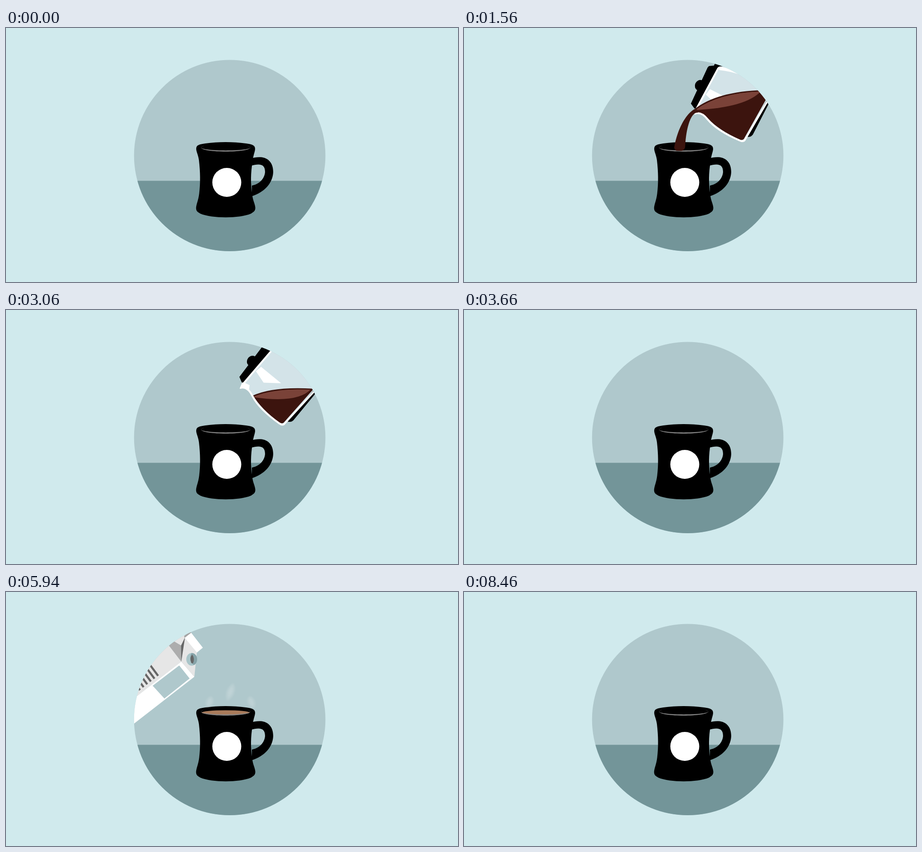
Animation of 998x561 px, one loop 9 s. Source, as an HTML page with a canvas:

```html
<!DOCTYPE html>
<html lang="en">
<head>
<meta charset="utf-8">
<title>Coffee with milk</title>
<style>
  html, body { margin: 0; width: 100%; height: 100%; overflow: hidden; background: #d0eaed; }
  canvas { display: block; width: 998px; height: 561px; }
</style>
</head>
<body>
<canvas id="stage" width="998" height="561"></canvas>
<script>
const ctx = document.getElementById('stage').getContext('2d');
const LOOP = 9000, STEP = 60;
const COFFEE = '#3c140e', WALL = '#afc8cc', PALE = '#e6e6e6', DARK = '#666';

const clamp = v => Math.max(0, Math.min(1, v));
const span = (t, a, b) => clamp((t - a) / (b - a));
const mix = (a, b, u) => a + (b - a) * u;
const mixPt = (p, q, u) => [mix(p[0], q[0], u), mix(p[1], q[1], u)];
const smooth = u => u * u * (3 - 2 * u);
const easeOut = u => 1 - (1 - u) * (1 - u);

// point on a cubic curve given as four points
function onCurve([a, b, c, d], u) {
  const ab = mixPt(a, b, u), bc = mixPt(b, c, u), cd = mixPt(c, d, u);
  return mixPt(mixPt(ab, bc, u), mixPt(bc, cd, u), u);
}

function fill(path, color) {
  ctx.fillStyle = color;
  ctx.fill(typeof path === 'string' ? new Path2D(path) : path);
}

function line(path, color, width) {
  ctx.strokeStyle = color;
  ctx.lineWidth = width;
  ctx.lineJoin = ctx.lineCap = 'round';
  ctx.stroke(new Path2D(path));
}

function ellipse(x, y, rx, ry, turn = 0) {
  const p = new Path2D();
  p.ellipse(x, y, rx, ry, turn, 0, Math.PI * 2);
  return p;
}

function layer(draw) {
  ctx.save();
  draw();
  ctx.restore();
}

function rotateAt(x, y, deg) {
  ctx.translate(x, y);
  ctx.rotate(deg * Math.PI / 180);
  ctx.translate(-x, -y);
}

const disc = ellipse(494, 281.8, 211.3, 211.3);
const opening = new Path2D('M283 60H706V264H539A54 7.5 0 0 1 431 264H283Z');

// --- mug ---
const mugBody = new Path2D(
  'M420 267C420 258 427 257 440 255C468 251 502 251 530 255C544 257 550 259 550 267' +
  'C550 273 546 280 544.5 294C540 322 540 342 543.5 367C545 382 550 388 550.5 397' +
  'C550.5 404 547 406 541 410C515 421 455 421 429 410C423 406 420 405 419.700 398' +
  'C419.700 390 424.500 382 426.500 366C429.500 342 429 318 426 292C424.500 280 420 273 420 267Z');
const mugHandle = new Path2D(
  'M540 288.500C548 286 554 285 562 285.300C580 286.500 590 299 590 318' +
  'C589 343 570 363 543 371.500V348C559 345 571 333 572 318C572 300 560 299 540 304.500Z');

function mug() {
  fill(mugHandle, '#000');
  fill(mugBody, '#000');
  fill(ellipse(487.5, 341, 32, 32), '#fff');
}

function mugRim() {
  fill('M430.500 264C433 276 537 276 539.500 264C536 272.500 434 272.500 430.500 264Z', '#858585');
  line('M431 265Q430 262 436 260.500M539 265Q540 262 534 260.500', '#333', 0.7);
}

function milkyCoffee(t) {
  const rise = smooth(span(t, 4920, 5640));
  if (!rise || t >= 8460) return;
  layer(() => {
    ctx.clip(ellipse(485, 265.5, 54, 7));
    ctx.globalAlpha = 1 - span(t, 7800, 8400);
    fill(ellipse(485, mix(277, 266.5, rise), 53, 5.3), '#a97b5b');
  });
}

// --- a falling liquid between two curves, shown from u = tail to u = head ---
const coffeeFall = [
  [[513, 177], [488, 188], [468, 230], [462.5, 274]],
  [[517, 187], [499, 184], [488, 230], [488, 274]]
];
const milkFall = [
  [[457, 187], [466, 198], [472, 225], [472, 275]],
  [[463, 187], [476, 196], [482, 225], [483, 275]]
];

function stream([left, right], tail, head, color) {
  if (head - tail < 0.02) return;
  const a = [], b = [], n = 40;
  for (let i = 0; i <= n; i++) {
    const u = mix(tail, head, i / n);
    const p = onCurve(left, u), q = onCurve(right, u);
    const pinch = 0.5 - 0.5 * Math.sqrt(clamp((head - u) / 0.07));
    a.push(mixPt(p, q, pinch));
    b.unshift(mixPt(q, p, pinch));
  }
  const shape = new Path2D();
  a.concat(b).forEach(p => shape.lineTo(...p));
  layer(() => {
    ctx.clip(opening);
    fill(shape, color);
  });
}

// --- coffee pot ---
const glass = new Path2D(
  'M510 178L558 88Q562 84 570 87C612 98 645 118 690 130L666 163L620 248' +
  'Q615 251 610 248C577 235 552 220 537 203C528 191 521 188 508 190Z');
const inside = new Path2D(
  'M509 181L560 90L700 100L665 161L618 245Q614 249 608 246' +
  'C579 233 554 217 539 200C530 190 520 186 509 188Z');

function pot(t) {
  if (t < 300 || t >= 3660) return;
  const coming = t < 1500;
  const slide = coming ? 1 - easeOut(span(t, 300, 840)) : span(t, 2980, 3600) ** 2;
  const lean = coming ? smooth(span(t, 840, 1200)) : 1 - smooth(span(t, 2480, 3060));
  const drain = span(t, 1200, 2400);

  layer(() => {
    ctx.translate(190 * slide, 8 * slide);
    rotateAt(596, 209, 12 * (1 - lean) + 18 * slide);

    fill('M625 240L668 160L675 163L638 235Q634 241 627 240.500Z', '#000');
    fill(glass, '#d3e3e8');
    fill('M543 135L594 161L556 168L534 147Z', '#fff');
    fill('M558 84Q585 86 612 104Q586 95 564 93Z', '#fff');

    // liquid surface from a to b, sinking as the pot empties
    const a = mixPt(mixPt([526, 181], [510, 180], lean), mixPt([538, 203], [510, 180], lean), drain);
    const b = mixPt(mixPt([654, 115], [658, 129], lean), mixPt([665, 159], [664, 161], lean), drain);
    const mx = (a[0] + b[0]) / 2, my = (a[1] + b[1]) / 2;
    const bow = mix(8, 18, lean);
    const top = `M${a}Q${mx - 25} ${my - bow} ${b}`;

    line('M513.500 177L559 92Q562 87 568 89', '#fff', 5);
    layer(() => {
      ctx.clip(inside);
      fill(`${top}L720 270L480 270Z`, COFFEE);
      fill(`M${a[0] + 4} ${a[1] - 1}Q${mx - 23} ${my - bow + 3} ${b[0] - 4} ${b[1] + 1}` +
           `Q${mx + 38} ${my + 16} ${a[0] + 4} ${a[1] + 1}Z`, '#7a4238');
      line(top, COFFEE, 2.5);
    });
    line('M670 161.500L619.500 248Q616 251.500 610 249' +
         'C577 235 552 219 538 202C529 190 520 186 510 189', '#fff', 4);
    const pouring = t > 1140 && t < 2640;
    if (!pouring) fill('M510 176L507 192Q510 193 514 189Q520 187 528 193L527 180Z', '#fff');

    fill('M501 167L538 87L541 84L552 83L556 74L579 80L570 85Q562 84 559 89L511.500 177.500L509 178Z',
         '#000');
    fill(ellipse(520.5, 126.5, 10.5, 12, 0.45), '#000');
  });

  stream(coffeeFall, span(t, 2520, 2820) ** 1.5, span(t, 1110, 1350), COFFEE);
}

// --- milk carton ---
function carton(t) {
  if (t < 4020 || t > 6840) return;
  const away = t < 5100 ? (1 - span(t, 4020, 4840)) ** 2 : span(t, 5400, 6400) ** 2;
  layer(() => {
    rotateAt(333, 318, 2.8 - 74 * away);
    fill('M411 103L437 180L200 262L174 184Z', PALE);
    fill('M437 180L453.500 221L216 303L200 262Z', '#fff');
    fill('M360 210L430 186.500L442.500 221L375.500 245Z', WALL);
    for (let i = 0; i < 6; i++) {
      const x = -9.6 * i, y = 3.4 * i;
      ctx.strokeStyle = DARK;
      ctx.lineWidth = 4.6;
      ctx.lineCap = 'butt';
      ctx.beginPath();
      ctx.moveTo(357.5 + x, 127.5 + y);
      ctx.lineTo(378.5 + x, 193 + y);
      ctx.stroke();
    }
    fill('M437 180L461 131L476 172L453.500 221Z', PALE);
    fill('M411 103L463 128L459 136L448 146Z', PALE);
    fill('M411 103L448 146L437 180Z', '#adadad');
    fill('M437 180L448 146L462 132Z', DARK);
    fill('M461 132L478 126L492 166L476 172Z', '#fff');
    fill('M461 128.500L476.500 122.500L478.500 126.500L461 132.500Z', '#a5a5a5');

    // spout ring and hole
    const ring = ellipse(460.5, 182.5, 12, 14, 0.32);
    fill(ring, '#a9c5c9');
    layer(() => {
      ctx.clip(ring);
      fill(ellipse(470, 182, 12, 17, 0.32), '#86a3a8');
    });
    fill('M457 190Q456 177 465 173Q468 184 460 192Z', DARK);
  });
  stream(milkFall, span(t, 5240, 5440) ** 1.4, span(t, 4560, 4800), '#fff');
}

// --- steam ---
function puff(x, y, rx, ry, turn, alpha) {
  layer(() => {
    ctx.translate(x, y);
    ctx.rotate(turn);
    ctx.scale(rx, ry);
    const g = ctx.createRadialGradient(0, 0, 0, 0, 0, 1);
    g.addColorStop(0, `rgba(255,255,255,${alpha})`);
    g.addColorStop(0.5, `rgba(255,255,255,${alpha * 0.6})`);
    g.addColorStop(1, 'rgba(255,255,255,0)');
    ctx.fillStyle = g;
    ctx.fillRect(-1, -1, 2, 2);
  });
}

function steam(t) {
  if (t < 5400 || t >= 8400) return;
  const fade = 1 - span(t, 7500, 8400);
  const height = start => 253 - 140 * span(t, start, start + 3000) ** 0.62;
  [[446, 420, 0], [495, 0, -1.4], [544, 420, 3]].forEach(([x, delay, phase], k) => {
    const head = height(5400 + delay), tail = height(5850 + delay);
    if (tail - head < 3) return;
    const n = 9;
    for (let i = 0; i <= n; i++) {
      const u = i / n, y = mix(tail, head, u);
      const wave = (253 - y) / 22 + phase;
      const thick = 0.45 + 0.55 * Math.sin(u * Math.PI);
      const alpha = (k === 1 ? 0.075 : 0.05) * thick * fade;
      puff(x + 8 * Math.sin(wave), y, 12 * thick, 14 * thick, 0.5 * Math.cos(wave), alpha);
    }
  });
}

function draw(time) {
  const t = Math.floor((time % LOOP) / STEP) * STEP;
  ctx.fillStyle = '#d0eaed';
  ctx.fillRect(0, 0, 998, 561);
  layer(() => {
    ctx.clip(disc);
    ctx.fillStyle = WALL;
    ctx.fillRect(280, 60, 430, 440);
    ctx.fillStyle = '#739599';
    ctx.fillRect(280, 337.5, 430, 160);
    mug();
    milkyCoffee(t);
    mugRim();
    pot(t);
    carton(t);
    steam(t);
  });
}

let start;
function tick(now) {
  if (start === undefined) start = now;
  draw(now - start);
  requestAnimationFrame(tick);
}
draw(0);
requestAnimationFrame(tick);
</script>
</body>
</html>
```
